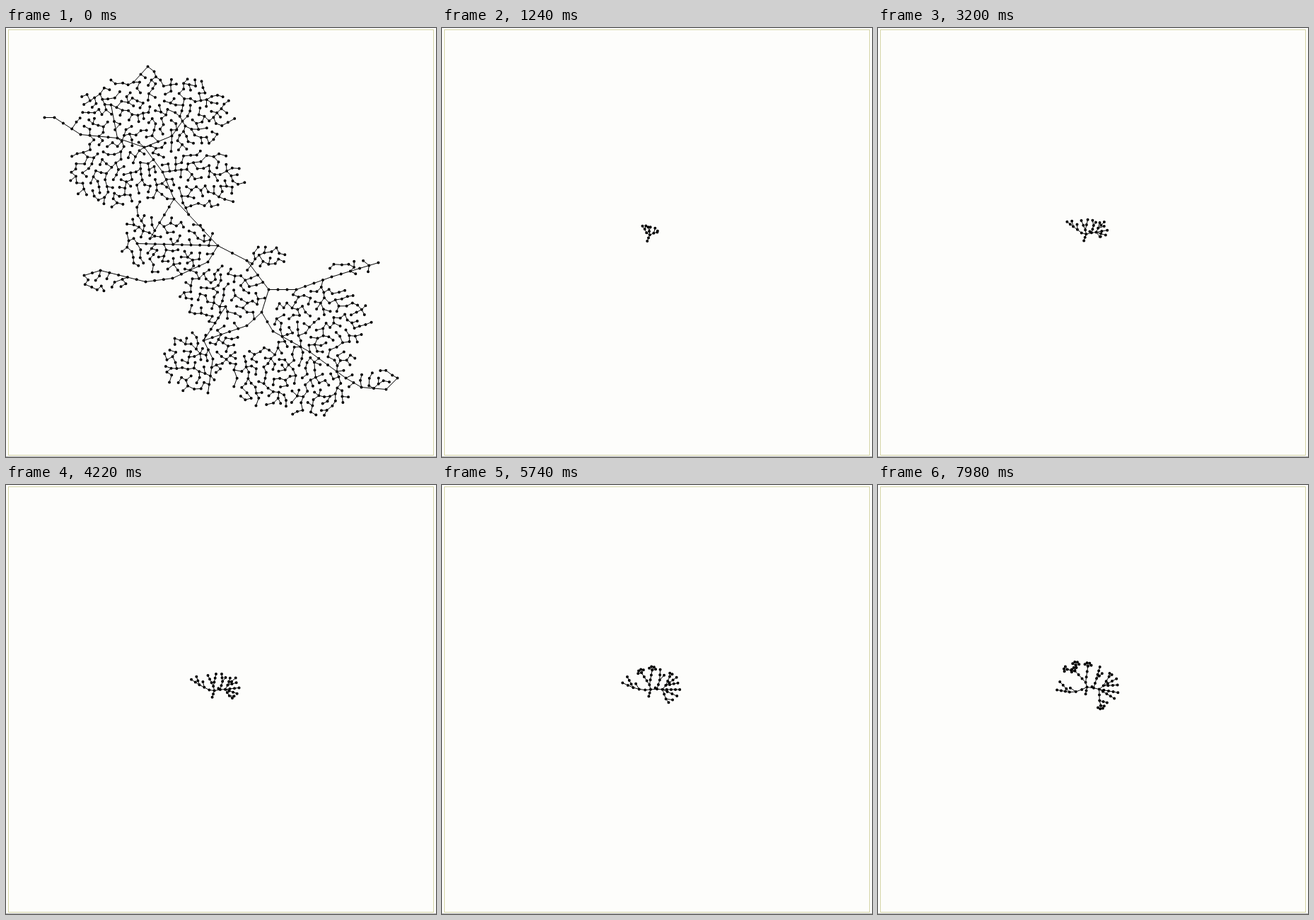
Animation of 608x606 px, one loop 8000 ms. Source, as an HTML page with a canvas:

```html
<!DOCTYPE html>
<html lang="en">
<head>
<meta charset="utf-8">
<title>Growing tree</title>
<style>
  html, body { margin: 0; width: 100%; height: 100%; overflow: hidden; background: #fdfdfb; }
  canvas { display: block; }
</style>
</head>
<body>
<canvas id="stage" width="608" height="606"></canvas>
<script>
const ctx = document.getElementById("stage").getContext("2d");
const LOOP = 8000;
const LAST_STEP = 162;

function seeded(seed) {
  return () => {
    seed = (seed + 0x6D2B79F5) | 0;
    let v = Math.imul(seed ^ (seed >>> 15), 1 | seed);
    v = (v + Math.imul(v ^ (v >>> 7), 61 | v)) ^ v;
    return ((v ^ (v >>> 14)) >>> 0) / 4294967296;
  };
}
const mix = (a, b, u) => a + (b - a) * u;
const mixPoint = (p, q, u) => ({ x: mix(p.x, q.x, u), y: mix(p.y, q.y, u) });
const gap = (p, q) => Math.hypot(p.x - q.x, p.y - q.y);
const polar = (p, r, a) => ({ x: p.x + r * Math.cos(a), y: p.y + r * Math.sin(a) });

// Movement comes in bursts of 17 steps with a short rest after each.
function burstSteps(time) {
  if (time < 0) return 0;
  const period = 832, burst = 17;
  const inBurst = 1 + Math.floor((time % period) / 42);
  return Math.floor(time / period) * burst + Math.min(burst, inBurst);
}
// The second run of bursts starts before the first would have gone on.
const stepAt = time => burstSteps(Math.min(time, 3500) - 20) + burstSteps(time - 3640);

// ---- young tree: every limb lengthens and turns steadily after its birth ----
const parts = [];
const limb = (id, parent, born, reach, from, to) => parts.push({ id, parent, born, reach, from, to });
const fan = (parent, born, count) => parts.push({ parent, born, count });

limb("stub", "core", 0, 5, 116, 101);
limb("stubEnd", "stub", 2, 5, 114, 101);

limb("left", "core", 0, 8, 225, 155);
limb("left2", "left", 2, 9, 260, 160);
limb("left3", "left2", 14, 9, 238, 176);
limb("left4", "left3", 30, 18, 230, 190);
limb("leftTwig", "left3", 55, 20, 260, 227);
limb("leftBud", "left2", 22, 9.5, 292, 214);

limb("mid", "core", 3, 7, 262, 254);
limb("slant", "mid", 20, 22, 257, 227);
limb("up", "mid", 20, 23, 286, 278);
fan("slant", 88, 4);
fan("up", 96, 4);
limb("slantA", "slant", 142, 11, 200, 191);
limb("slantB", "slant", 145, 8, 285, 277);
fan("slantA", 148, 3);
fan("slantB", 148, 4);

limb("joint", "core", 0, 9.5, -30, 7);
limb("jointBud", "joint", 34, 3, 215, 215);
limb("post", "joint", 1, 14, 285, 287);
limb("postA", "post", 55, 17, 255, 286);
limb("postB", "post", 60, 10.5, 304, 318);

limb("hub", "joint", 10, 8, -20, 14);
limb("spoke", "hub", 26, 7.8, 284, 320);
limb("spokeA", "spoke", 45, 15, 283, 302);
fan("spokeA", 92, 2);
limb("spokeB", "spoke", 32, 21, 308, 332);
limb("spokeC", "spoke", 50, 20, 338, 357);
limb("east", "hub", 28, 27, -19, 10);
limb("southEast", "hub", 34, 25, 12, 31);
limb("south", "hub", 48, 16, 42, 88);
limb("southA", "south", 68, 11, 0, 15);
limb("southB", "south", 70, 7, 30, 76);
fan("southB", 124, 4);

function youngTree(step) {
  const life = step / LAST_STEP;
  const root = { x: 293 + 2 * life, y: 292 - 7 * life * life };
  const ends = { core: { point: root, angle: 0 } };
  const nodes = [root], edges = [];
  const join = (p, q) => { nodes.push(q); edges.push([p, q]); };
  const sprout = age => Math.min(1, (age + 1) / 5);

  for (const part of parts) {
    const base = ends[part.parent];
    const age = step - part.born;
    if (!base || age < 0) continue;
    if (part.count) {
      for (let i = 0; i < part.count && age >= i * 3; i++) {
        const turn = (i - (part.count - 1) / 2) * 0.77;
        join(base.point, polar(base.point, 5 * sprout(age - i * 3), base.angle + turn));
      }
      continue;
    }
    const t = Math.min(1, age / (LAST_STEP - part.born));
    const length = mix(Math.min(4.5, part.reach), part.reach, 1 - (1 - t) ** 2) * sprout(age);
    const angle = mix(part.from, part.to, t) * Math.PI / 180;
    const tip = polar(base.point, length, angle);
    const count = Math.max(1, Math.round(length / 6.7));
    let last = base.point;
    for (let i = 1; i <= count; i++) {
      const next = mixPoint(base.point, tip, i / count);
      join(last, next);
      last = next;
    }
    ends[part.id] = { point: tip, angle };
  }
  return { nodes, edges };
}

// ---- grown tree: a few boughs, then twigs that fill the crowns ----
function grownTree() {
  const random = seeded(5);
  const nodes = [], edges = [];

  function addNode(p) {
    const found = nodes.find(n => gap(n, p) < 2);
    if (found) return found;
    const node = { ...p, depth: 0, links: 1 };
    nodes.push(node);
    return node;
  }
  function bough(spacing, ...corners) {
    let last = addNode({ x: corners[0], y: corners[1] });
    for (let i = 2; i < corners.length; i += 2) {
      const from = last, to = { x: corners[i], y: corners[i + 1] };
      const pieces = Math.max(1, Math.round(gap(from, to) / spacing));
      for (let k = 1; k <= pieces; k++) {
        const next = addNode(mixPoint(from, to, k / pieces));
        edges.push([last, next]);
        last = next;
      }
    }
  }

  bough(28, 148, 108, 157, 155, 195, 168, 221, 203, 237, 241, 299, 307, 340, 328, 371, 369, 361, 401);
  bough(28, 195, 168, 234, 152, 249, 131);
  bough(16, 361, 401, 377, 428, 429, 457, 480, 494, 502, 507, 537, 510, 553, 494);
  bough(13, 361, 401, 340, 420, 279, 441, 292, 467, 285, 515);
  bough(18, 279, 441, 310, 393);
  bough(13, 157, 155, 105, 150, 68, 126, 54, 126);
  bough(13, 237, 241, 203, 297);
  bough(13, 299, 307, 185, 304);
  bough(13, 299, 307, 285, 330, 235, 353, 197, 358, 133, 342, 110, 349);
  bough(13, 371, 369, 410, 369, 460, 351, 526, 331);
  bough(13, 180, 76, 200, 54, 209, 61);

  // Crowns: centre and radii of wavy ellipses.
  const crowns = [
    [210, 122, 108, 55], [165, 202, 76, 50], [276, 214, 58, 42],
    [232, 308, 66, 38], [192, 278, 26, 15], [140, 360, 28, 14],
    [370, 322, 29, 16], [306, 376, 58, 40], [262, 472, 40, 42], [310, 450, 18, 30],
    [446, 412, 68, 46], [425, 487, 70, 60], [367, 494, 48, 42],
    [522, 496, 28, 14], [488, 337, 30, 10]
  ];
  const inside = p => crowns.some(([x, y, rx, ry]) => {
    const dx = (p.x - x) / rx, dy = (p.y - y) / ry;
    return Math.hypot(dx, dy) < 1 + 0.07 * Math.sin(11 * Math.atan2(dy, dx));
  });

  const loose = [];
  for (let i = 0; i < 60000; i++) {
    const p = { x: 50 + random() * 510, y: 50 + random() * 505, cost: Infinity };
    if (!inside(p)) continue;
    const near = n => gap(n, p) < 7.6;
    if (!nodes.some(near) && !loose.some(near)) loose.push(p);
  }

  // Join the cheapest loose node each time; far and forked hosts cost more.
  function offer(p, host) {
    const cost = gap(p, host) + host.depth * 0.08 + host.links * 1.5;
    if (cost < p.cost) Object.assign(p, { cost, host });
  }
  for (const p of loose) nodes.forEach(n => offer(p, n));
  while (loose.length) {
    let best = 0;
    loose.forEach((p, i) => { if (p.cost < loose[best].cost) best = i; });
    const [p] = loose.splice(best, 1);
    const reach = gap(p, p.host);
    if (reach > 24) continue;
    const node = { x: p.x, y: p.y, depth: p.host.depth + reach, links: 0 };
    p.host.links++;
    nodes.push(node);
    edges.push([p.host, node]);
    loose.forEach(q => offer(q, node));
  }
  return { nodes, edges };
}

function draw({ nodes, edges }) {
  ctx.setTransform(1, 0, 0, 1, 0, 0);
  ctx.fillStyle = "#fdfdfb";
  ctx.fillRect(0, 0, 608, 606);
  ctx.lineWidth = 1;
  ctx.strokeStyle = "#d5d5a8";
  ctx.strokeRect(3.5, 2.5, 601, 601);
  ctx.fillStyle = "#b0b0ac";
  ctx.fillRect(0, 605, 608, 1);

  ctx.translate(0.5, 0.5);
  ctx.strokeStyle = ctx.fillStyle = "#000";
  ctx.beginPath();
  for (const [p, q] of edges) {
    ctx.moveTo(p.x, p.y);
    ctx.lineTo(q.x, q.y);
  }
  ctx.stroke();
  ctx.beginPath();
  for (const { x, y } of nodes) {
    ctx.moveTo(x + 2, y);
    ctx.arc(x, y, 2, 0, 2 * Math.PI);
  }
  ctx.fill();
}

const grown = grownTree();
const start = performance.now();
let shown = -1;

function render() {
  const step = stepAt((performance.now() - start) % LOOP);
  if (step !== shown) draw(step ? youngTree(step) : grown);
  shown = step;
  requestAnimationFrame(render);
}
render();
</script>
</body>
</html>
```
